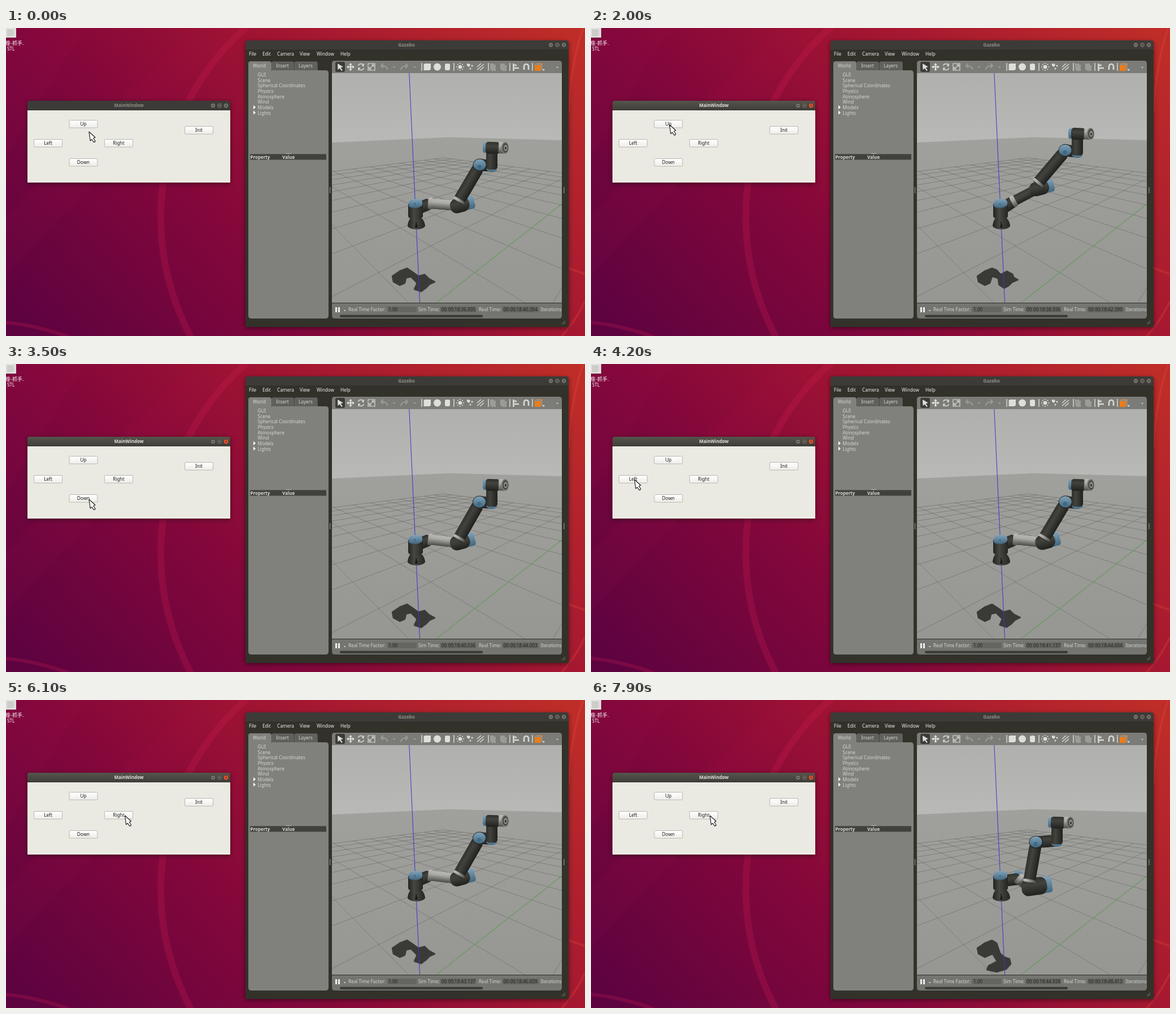
Recreate the animation shown at these times as an HTML page. Size 1025 by 546 pixels, loop 8 s.

```html
<!DOCTYPE html>
<html lang="en">
<head>
<meta charset="utf-8">
<title>Robot arm control</title>
<style>
html, body { margin: 0; width: 100%; height: 100%; overflow: hidden; background: #7a0a3a; }
svg { display: block; width: 100vw; height: 100vh; }
text { font: 8.2px "Noto Sans", "Open Sans", sans-serif; fill: #d6d6d2; white-space: pre; }
.bold { font-weight: bold; font-size: 8px; }
.menu text { fill: #eeeeea; }
.value { fill: #252522; }
.button text { fill: #1c1c1a; text-anchor: middle; }
.cjk { font: 9px "Noto Sans CJK SC", "Noto Sans CJK", sans-serif; fill: #fff; }
.line { fill: none; stroke: #d9d9d6; stroke-width: 1.5; }
.dim { opacity: .32; }
</style>
</head>
<body>
<svg viewBox="0 0 1025 546" preserveAspectRatio="none">
<defs>
  <linearGradient id="wall" gradientUnits="userSpaceOnUse" x1="60" y1="560" x2="860" y2="-150">
    <stop offset="0" stop-color="#5d0340"/><stop offset=".35" stop-color="#83073b"/>
    <stop offset=".62" stop-color="#a11432"/><stop offset="1" stop-color="#bf2d28"/>
  </linearGradient>
  <linearGradient id="sky" x2="0" y2="1"><stop offset="0" stop-color="#b0b0ae"/><stop offset="1" stop-color="#b9b9b7"/></linearGradient>
  <linearGradient id="floor" x2="0" y2="1"><stop offset="0" stop-color="#a0a09d"/><stop offset="1" stop-color="#969693"/></linearGradient>
  <linearGradient id="title" x2="0" y2="1"><stop offset="0" stop-color="#57554d"/><stop offset="1" stop-color="#3d3c37"/></linearGradient>
  <linearGradient id="face" x2="0" y2="1"><stop offset="0" stop-color="#fff"/><stop offset="1" stop-color="#eeede8"/></linearGradient>
  <linearGradient id="dark" x2="0" y2="1"><stop offset="0" stop-color="#30302c"/><stop offset=".35" stop-color="#43433e"/><stop offset="1" stop-color="#20201e"/></linearGradient>
  <linearGradient id="light" x2="0" y2="1"><stop offset="0" stop-color="#b9b9b5"/><stop offset=".35" stop-color="#aaaaa6"/><stop offset="1" stop-color="#4c4c49"/></linearGradient>
  <linearGradient id="blue" x2="0" y2="1"><stop offset="0" stop-color="#7fa3b9"/><stop offset="1" stop-color="#41667f"/></linearGradient>
  <linearGradient id="column"><stop offset="0" stop-color="#24241f"/><stop offset=".4" stop-color="#484842"/><stop offset="1" stop-color="#252522"/></linearGradient>
  <clipPath id="view"><rect x="577" y="80" width="407" height="407"/></clipPath>
  <clipPath id="bar"><rect x="577" y="487" width="407" height="28"/></clipPath>
  <filter id="soft"><feGaussianBlur stdDeviation=".6"/></filter>
  <filter id="drop" x="-10%" y="-10%" width="120%" height="125%"><feDropShadow dx="0" dy="2" stdDeviation="4" flood-opacity=".45"/></filter>
</defs>

<rect width="1025" height="546" fill="url(#wall)"/>
<g fill="none" stroke="#d01c50" opacity=".25">
  <circle cx="725" cy="335" r="451" stroke-width="12"/>
  <path d="M0 522Q55 527 112 548" stroke-width="6"/>
  <path d="M1022 0Q1000 60 996 150M994 425L1025 436M984 546Q1008 520 1025 484" stroke="#e8503c" stroke-width="4"/>
</g>
<path d="M0 0H140L0 230ZM0 330L330 0H410L0 440Z" fill="#c0184c" opacity=".05"/>

<path d="M0 0H18V17H0Z" fill="#dededb"/>
<path d="M2 4H13M2 7H14M2 10H14M2 13H12" stroke="#aaa" fill="none"/>
<text class="cjk" x="-1" y="30">座-抓手.</text>
<text x="2" y="40" style="fill:#fff">STL</text>

<g filter="url(#drop)">
  <path d="M38 146V133Q38 129 42 129H393Q397 129 397 133V146Z" fill="#3c3b37"/>
  <path id="focus" d="M38 146V133Q38 129 42 129H393Q397 129 397 133V146Z" fill="url(#title)"/>
  <rect x="38" y="146" width="359" height="128" fill="#ebeae2"/>
</g>
<text id="caption" class="bold" x="217.5" y="140" text-anchor="middle">MainWindow</text>
<g id="buttons"></g>

<g filter="url(#drop)">
  <path d="M424 530V27Q424 22 429 22H991Q996 22 996 27V530Z" fill="#30302c"/>
  <path d="M424 38V27Q424 22 429 22H991Q996 22 996 27V38Z" fill="#3c3b37"/>
</g>
<text class="bold" x="709" y="33" text-anchor="middle" style="fill:#8f8d84">Gazebo</text>
<g id="menu" class="menu"></g>
<g fill="#5f605b" stroke="#7a7a75" stroke-width=".8">
  <path d="M471 75V62Q471 60 473 60H507Q509 60 509 62V75M511 75V62Q511 60 513 60H549Q551 60 551 62V75"/>
</g>
<path d="M429 75V63Q429 59 433 59H466Q470 59 470 63V75H566Q571 75 571 80V510Q571 515 566 515H434Q429 515 429 510Z" fill="#80817c"/>
<g id="tree"></g>
<path d="M438 137L442 140.500L438 144ZM438 146.500L442 150L438 153.500Z" fill="#fff"/>
<path d="M496 222.500H505" stroke="#b5b5b1"/>
<rect x="432" y="223.500" width="135" height="10" fill="#40403c"/>
<text class="bold" x="432.500" y="231.500">Property</text><text class="bold" x="489" y="231.500">Value</text>
<path d="M573.500 282V293M988 282V293" stroke="#83837e" stroke-width="1.500"/>

<path d="M577 80V63Q577 58 582 58H979Q984 58 984 63V80Z" fill="#7b7c77"/>
<rect x="583" y="60" width="17" height="18" rx="3" fill="#3b3b37"/>
<g fill="#dededb">
  <path d="M587 63L597 69L592.500 70.200L596 75L594 76L590.700 71.500L587.500 74Z"/>
  <path d="M610 62L613 65.500H611V68H613.500V66L617 69L613.500 72V70H611V72.500H613L610 76L607 72.500H609V70H606.500V72L603 69L606.500 66V68H609V65.500H607Z"/>
  <path d="M739.500 64L742 63H752V73L749.500 75H739.500Z"/><circle cx="763.500" cy="69" r="6.500"/>
  <path d="M777 65Q777 63 781.500 63T786 65V73Q786 75 781.500 75T777 73Z"/>
  <circle cx="804" cy="69" r="3.300"/><path d="M816 63L822 64L820 69L816 67Z"/>
  <circle cx="825" cy="67" r="1.500"/><circle cx="822" cy="72" r="1.500"/>
</g>
<g class="line">
  <path d="M623.500 67A5 5 0 0 1 633 67M633.500 71A5 5 0 0 1 624 71M633 63V67H630M624 75V71H627"/>
  <path d="M641 63H653V75H641ZM643 73L651 65M647 65H651V69M643 69V73H647" stroke-width="1.200"/>
  <path d="M804 62V64M804 74V76M797 69H799M809 69H811M799 64L800.500 65.500M807.500 72.500L809 74M799 74L800.500 72.500M807.500 65.500L809 64"/>
  <path d="M834 69L841 63M834 74L846 64M839 75L846 69"/>
  <path d="M898.500 63V76M900 66H904M900 71H908" stroke-width="2.600"/>
  <path d="M917 74V68A4 4 0 0 1 925 68V74" stroke-width="2.600"/>
  <path d="M736 62V76M793 62V76M854 62V76M892 62V76M932 62V76" stroke="#e7e7e4" stroke-width="1.300"/>
  <path class="dim" d="M675 74Q675 67 665 67M668 63L664 67L668 71M699 74Q699 67 710 67M707 63L711 67L707 71M685 69H689M721 69H725" stroke-width="2"/>
</g>
<g fill="#e0e0dd" class="dim"><path d="M857 63H864V65H867V76H859V74H857ZM875 63H883V66H886V76H878V74H875Z"/></g>
<path d="M936 65L939 63H949V72L946 76H936Z" fill="#8c8d88"/><path d="M936 66H946V76H936Z" fill="#ee7c14"/>
<path d="M936 65.500L939 63H949V72L946 75.500M946 66L949 63" fill="none" stroke="#e08a3c"/>
<path d="M949 73H954L951.500 76ZM974 69H978L976 71Z" fill="#dcdcd8"/>

<g clip-path="url(#view)">
  <rect x="577" y="80" width="407" height="125" fill="url(#sky)"/>
  <path d="M577 203L784 193.500L984 199V487H577Z" fill="url(#floor)"/>
  <path id="grid" fill="none" stroke="#4d4d4a" stroke-width=".6" opacity=".65"/>
  <path id="green" stroke="#54a944" stroke-width=".9"/>
  <polygon id="shadow" fill="#3a3b37" stroke="#3a3b37" stroke-width="2.500" stroke-linejoin="round" filter="url(#soft)"/>
  <path d="M713.800 80L732.500 487" stroke="#3d35cf" stroke-width="1"/>
  <path d="M711 350Q712 341 717 336H735Q741 342 742 350A15.500 7 0 0 1 711 350Z" fill="url(#column)"/>
  <path d="M724 354L726 342L729 354Z" fill="#1b1b19"/>
  <g id="arm"></g>
</g>
<path d="M577 487.500H984" stroke="#30302c"/>
<path d="M577 488H984V510Q984 515 979 515H582Q577 515 577 510Z" fill="#747570"/>
<path d="M583 495H586V504H583ZM588 495H591V504H588ZM598.500 500H601V501.500H598.500Z" fill="#eeeeeb"/>
<path d="M675 494H727V504H675ZM769 494H832V504H769ZM879 494H943V504H879Z" fill="#656661"/>
<rect x="591" y="508.500" width="253" height="4.500" rx="2" fill="#3c3c38"/>
<g clip-path="url(#bar)">
  <text x="606" y="502">Real Time Factor:</text><text class="value" x="677" y="502">1.00</text>
  <text x="730" y="502">Sim Time:</text><text id="sim" class="value" x="771" y="502"></text>
  <text x="837" y="502">Real Time:</text><text id="real" class="value" x="880.500" y="502"></text>
  <text x="946.500" y="502">Iterations:</text>
</g>
<path d="M984 525L990 519M987 525L990 522" stroke="#83837e"/>
<g id="controls"></g>
<path id="cursor" d="M0 0L11 10L7.800 11.200L11 16.500Q10.500 18.700 8.300 18.300L5 13.500L2.200 15.800Z" fill="#fff" stroke="#222" stroke-width="1.200" stroke-linejoin="round"/>
</svg>

<script>
const LOOP = 8000, STEP = 100;
const $ = id => document.getElementById(id);
const label = (text, x, y) => `<text x="${x}" y="${y}">${text}</text>`;

$('menu').innerHTML = [['File', 430], ['Edit', 454], ['Camera', 480], ['View', 520], ['Window', 550], ['Help', 592]]
  .map(([text, x]) => label(text, x, 49)).join('');
$('tree').innerHTML = ['GUI', 'Scene', 'Spherical Coordinates', 'Physics', 'Atmosphere', 'Wind', 'Models', 'Lights']
  .map((text, i) => label(text, 445.5, 86 + i * 9.65)).join('') +
  label('World', 437, 70) + label('Insert', 478, 70) + label('Layers', 518, 70);
$('buttons').innerHTML = [['Up', 112, 163], ['Left', 49.5, 197], ['Right', 174.5, 197], ['Down', 112, 231], ['Init', 316.5, 174]]
  .map(([text, x, y]) => `<g class="button"><rect id="${text}" x="${x}" y="${y + .5}" width="50" height="13.500" rx="1.500"
    fill="url(#face)" stroke="#b3b1aa" stroke-width=".9"/>${label(text, x + 25, y + 10)}</g>`).join('');

const control = (x, y, kind, id = '') =>
  `<circle id="${id}" cx="${x}" cy="${y}" r="4.300" fill="#75736a" stroke="#34332f" stroke-width=".7"/>
   <path d="${['M-2 0H2', 'M-1.700 -1.700H1.700V1.700H-1.700Z', 'M-1.500 -1.500L1.500 1.500M1.500 -1.500L-1.500 1.500'][kind]}"
    transform="translate(${x} ${y})" fill="none" stroke="#33322e" stroke-width=".9"/>`;
$('controls').innerHTML = [0, 1, 2].map(i =>
  control(366.500 + i * 11.500, 137.500, i, i === 2 ? 'close' : '') + control(964.500 + i * 11.500, 30, i)).join('');

// Ground grid seen by a camera two metres up, looking along the (-1, 1) diagonal.
const camera = { ahead: 1.773, side: -.297, height: 2, pitch: .27564, focal: 352 };
function project(x, y) {
  const { ahead, side, height, pitch, focal } = camera;
  const forward = ahead + (y - x) * Math.SQRT1_2, right = side + (x + y) * Math.SQRT1_2;
  const depth = forward * Math.cos(pitch) + height * Math.sin(pitch);
  const down = height * Math.cos(pitch) - forward * Math.sin(pitch);
  return [780.5 + focal * right / depth, 283.5 + focal * down / depth].map(v => v.toFixed(1)).join(' ');
}
const near = -2.5;
const alongY = k => k + near > 10 ? '' : `M${project(k, Math.max(-10, k + near))}L${project(k, 10)}`;
const alongX = k => k - near < -10 ? '' : `M${project(Math.min(10, k - near), k)}L${project(-10, k)}`;
let lines = '';
for (let k = -10; k <= 10; k++) lines += alongY(k) + alongX(k);
$('grid').setAttribute('d', lines);
$('green').setAttribute('d', `M${project(0, 0)}L${project(0, 10)}`);

// joints: shoulder cap, shoulder, elbow, forearm start, elbow cap, wrist, hand;
// then upper arm brightness and elbow width
const rest = {
  joints: [745, 309, 751, 311, 800, 315, 802, 306, 822, 309, 839, 243, 860, 212, 1, 26],
  shade: [719, 432, 730, 440, 741, 437, 748, 444, 759, 450, 750, 454, 743, 461, 735, 467, 723, 463, 728, 452, 717, 441, 708, 443]
};
const raised = {
  joints: [744, 309, 748, 307, 789, 284, 791, 273, 812, 278, 840, 216, 861, 186, 0, 25],
  shade: [718, 429, 725, 437, 736, 431, 746, 436, 748, 442, 756, 446, 746, 450, 740, 456, 732, 461, 722, 455, 721, 444, 710, 440]
};
const reached = {
  joints: [745, 309, 751, 310, 806, 304, 810, 298, 825, 298, 862, 243, 874, 213, .85, 28],
  shade: [718, 429, 733, 436, 744, 432, 752, 438, 770, 442, 763, 448, 757, 456, 745, 461, 731, 458, 729, 449, 718, 440, 708, 442]
};
const folded = {
  joints: [757, 308, 758, 317, 776, 332, 776, 321, 809, 327, 788, 252, 825, 217, .6, 31],
  shade: [718, 431, 721, 440, 724, 449, 732, 456, 741, 459, 743, 468, 735, 477, 718, 482, 701, 478, 704, 471, 719, 463, 711, 450]
};
const mix = (a, b, k) => a.map((v, i) => v + (b[i] - v) * k);
const mixPose = (a, b, k) => ({ joints: mix(a.joints, b.joints, k), shade: mix(a.shade, b.shade, k) });
const settled = {
  joints: [745, 309, 751, 311, 800, 317, 802, 309, 823, 311, 838.5, 245, 860, 214, 1, 26],
  shade: rest.shade
};

const armMoves = [[1300, 2100, raised], [2700, 3500, settled], [4100, 4700, reached],
  [5500, 6100, settled], [6500, 7100, mixPose(settled, folded, .48)], [7200, 7900, folded]];
const cursorMoves = [[0, 300, [139, 171.5]], [2000, 2400, [147, 240]], [3500, 3900, [77, 205]], [4900, 5300, [210.5, 205]]];
const presses = [['Up', 1100, 1300], ['Down', 2500, 2700], ['Left', 4000, 4100],
  ['Right', 5400, 5500], ['Right', 6300, 6500], ['Right', 7000, 7100]];

function follow(moves, start, blend, t) {
  let value = start;
  for (const [from, to, goal] of moves) {
    if (t <= from) break;
    const k = Math.min(1, (t - from) / (to - from));
    value = blend(value, goal, k * k * (3 - 2 * k));
  }
  return value;
}

// A shaded cylinder from a to b, optionally lengthened at both ends.
function tube(a, b, width, fill, before = 0, after = 0, round = 3, opacity = 1) {
  const dx = b[0] - a[0], dy = b[1] - a[1], length = Math.hypot(dx, dy);
  const angle = Math.atan2(dy, dx) * 180 / Math.PI;
  return `<rect x="${-before}" y="${-width / 2}" width="${length + before + after}" height="${width}" rx="${round}"
    fill="url(#${fill})" opacity="${opacity}" transform="translate(${a}) rotate(${angle})"/>`;
}
const oval = ([x, y], rx, ry, fill) => `<ellipse cx="${x}" cy="${y}" rx="${rx}" ry="${ry}" fill="${fill}"/>`;
const toward = (a, b, d) => mix(a, b, d / Math.hypot(b[0] - a[0], b[1] - a[1]));

function drawArm(joints) {
  const [cap, shoulder, elbow, fore, elbowCap, wrist, hand] =
    Array.from({ length: 7 }, (_, i) => joints.slice(i * 2, i * 2 + 2));
  const [brightness, elbowWidth] = joints.slice(14);
  const at = (x, y) => [hand[0] + x, hand[1] + y];
  return oval(cap, 8, 6, 'url(#blue)') +
    tube([727, 321], shoulder, 21, 'dark', 0, 2, 7) +
    '<path d="M712 312H738V334Q737 339 725 339T712 334Z" fill="url(#column)"/>' +
    '<path d="M713 316V309Q715 303 726 303T737 309V314Q732 319 724 319T713 316Z" fill="url(#blue)"/>' +
    oval([724, 312], 1, 1, '#29475a') +
    tube(shoulder, elbow, 18, 'dark') +
    tube(shoulder, elbow, 18, 'light', 0, 0, 3, brightness) +
    tube(shoulder, toward(shoulder, elbow, 4), 21, 'light', 4, 0, 3) +
    tube(elbow, elbowCap, elbowWidth - 2, 'blue', 0, 7, 5) +
    tube(elbow, elbowCap, elbowWidth, 'dark', 14, -2, 12) +
    tube(fore, wrist, 21.5, 'dark', 4, -4, 6) +
    tube(fore, toward(fore, wrist, 3), 22, 'light', 2, 0, 2) +
    tube(wrist, at(0, 32), 21, 'dark', 6, 8, 7) +
    oval(wrist, 12.5, 11.5, '#292925') + oval([wrist[0] - .5, wrist[1] - .5], 11, 10, 'url(#blue)') +
    oval([wrist[0] - 1, wrist[1] + 3], 3.5, 3.5, '#42687f') +
    oval(at(0, 38), 9.500, 5, 'url(#blue)') +
    tube(at(0, 33), hand, 20, 'dark', 6, 0, 5) +
    tube(at(-16, 0), at(-8, 0), 19, 'blue', 0, 0, 5) +
    tube(at(-11, 0), at(14, 1), 21, 'dark', 0, 0, 5) +
    tube(at(12, 0), at(24, .5), 20.5, 'light', 0, 0, 3) +
    oval(at(23.5, .5), 6.500, 10.500, '#777773') + oval(at(24, .5), 5, 8.500, '#494945') +
    oval(at(24.5, .5), 3.300, 5.500, '#8d8d88') + oval(at(24.5, 1), 1.500, 2.400, '#33332f');
}

const clock = ms => `00 00:18:${(ms / 1000).toFixed(3)}`;

function render(now) {
  const t = Math.floor(now % LOOP / STEP) * STEP;
  const pose = follow(armMoves, rest, mixPose, t);
  $('arm').innerHTML = drawArm(pose.joints);
  $('shadow').setAttribute('points', [686, 450, 684, 440, 697, 431, 710, 426, ...pose.shade, 706, 452, 697, 456].join(' '));
  $('cursor').setAttribute('transform', `translate(${follow(cursorMoves, [147, 184], mix, t)})`);

  const focused = t >= 1100;
  $('focus').setAttribute('opacity', focused ? 1 : 0);
  $('caption').style.fill = focused ? '#e4e0d7' : '#8f8d84';
  $('close').setAttribute('fill', focused ? '#e5542d' : '#75736a');
  for (const name of ['Up', 'Down', 'Left', 'Right']) {
    const down = presses.some(([button, from, to]) => button === name && t >= from && t < to);
    $(name).setAttribute('fill', down ? '#d6d4ce' : 'url(#face)');
  }

  const elapsed = Math.floor((t + 100) / 200) * 200;
  $('sim').textContent = clock(36935 + elapsed * 1.0004);
  $('real').textContent = clock(40394 + elapsed * 1.0024);
}

const begin = performance.now();
function tick() {
  render(performance.now() - begin);
  requestAnimationFrame(tick);
}
tick();
</script>
</body>
</html>
```
